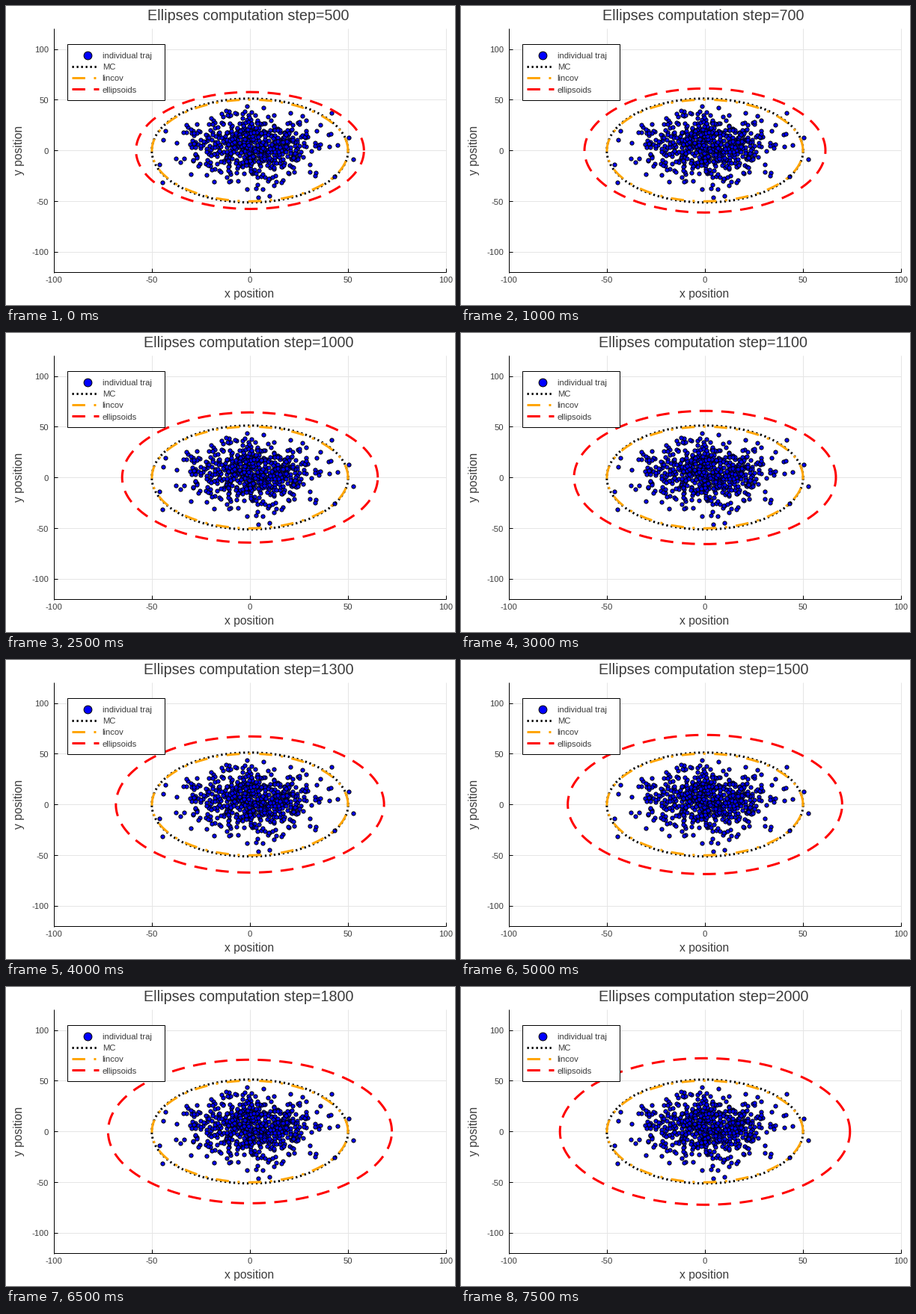
A matplotlib script that plays this animation: 600x400 px, repeating every 8 s.

```python
import numpy as np
import matplotlib.pyplot as plt
from matplotlib.animation import FuncAnimation
from matplotlib.patches import Rectangle

W, H, DPI = 600, 400, 100
PT = 72 / DPI                       # points per pixel
LEFT, RIGHT, TOP, BOTTOM = 64, 588, 30, 356
CX, CY = 326, 193.3
STEPS = 16
INK = "#3c3c3c"
DASH, DOT, DASHDOT = (0, (5.8, 3.85)), (0, (0.75, 1.25)), (0, (5.8, 3.85, 1, 3.85))

plt.rcParams["font.family"] = "Liberation Sans"
fig = plt.figure(figsize=(W / DPI, H / DPI), dpi=DPI, facecolor="white")
ax = fig.add_axes([0, 0, 1, 1])
ax.set(xlim=(0, W), ylim=(H, 0))
ax.axis("off")


def line(x, y, color="black", width=1, style="-", z=1):
    return ax.plot(x, y, color=color, lw=width * PT, ls=style, zorder=z,
                   solid_capstyle="butt", dash_capstyle="butt")[0]


def text(x, y, s, size, ha="center", va="baseline", **kw):
    return ax.text(x, y, s, fontsize=size * PT, color=INK, ha=ha, va=va,
                   zorder=8, **kw)


def dots(x, y, radius, z):
    ax.plot(x, y, "o", ms=2 * radius * PT, mfc="#0000ff", mec="black",
            mew=PT, zorder=z)


def ellipse(rx, ry):
    t = np.linspace(0, 2 * np.pi, 181)
    return CX + rx * np.cos(t), CY - ry * np.sin(t)


# Axes, grid and tick labels
for v in range(-100, 101, 50):
    x, y = CX + 2.62 * v, CY - 1.358 * v
    line([x, x], [TOP, BOTTOM], "#e5e5e5", z=0)
    line([LEFT, RIGHT], [y, y], "#e5e5e5", z=0)
    line([x, x], [BOTTOM, BOTTOM - 5])
    line([LEFT, LEFT + 5], [y, y])
    text(x, 370, v, 11.3)
    text(57, y + 4.3, v, 11.3, ha="right")
line([LEFT, LEFT], [TOP, BOTTOM + 0.5])
line([LEFT, RIGHT], [BOTTOM, BOTTOM])
text(325.5, 390, "x position", 15.6)
text(25, CY, "y position", 15.6, ha="right", va="center", rotation=90)
title = text(324, 19, "", 19.8)

# Scatter: a Gaussian cloud and a few lone points at its edge
rng = np.random.default_rng(7)
cloud = rng.normal(size=(660, 2))
cloud = cloud[np.hypot(*cloud.T) < 2.55] * (45, 22) + (329, 190)
lone = [(464, 204.5), (458, 175.5), (435, 143), (439, 228), (209, 236),
        (205, 212), (210, 179), (213, 167), (337, 256), (352, 254)]
dots(*np.vstack([lone, cloud]).T, 2.6, 2)

line(*ellipse(131.2, 69.5), "black", 3, DOT, 3)
line(*ellipse(131, 68), "#ffa500", 3, DASHDOT, 4)
outer = line([], [], "#ff0000", 3, DASH, 5)

# Legend
ax.add_patch(Rectangle((81.5, 50.5), 130, 75, fc="white", ec="black",
                       lw=PT, zorder=6))
dots([108.7], [66], 5.4, 7)
entries = [("individual traj", None, None), ("MC", "black", DOT),
           ("lincov", "#ffa500", DASHDOT), ("ellipsoids", "#ff0000", DASH)]
for i, (name, color, style) in enumerate(entries):
    y = 66 + 15.1 * i
    if style:
        line([87.7, 123.7], [y, y], color, 3, style, 7)
    text(128.7, y + 4.3, name, 11.3, ha="left")


def half_axes(k):
    """Fast growth at first, then a steady rate."""
    keys = [0, 2, 4, 6, STEPS - 1]
    return (np.interp(k, keys, [152.3, 161, 166.6, 175, 193.8]),
            np.interp(k, keys, [78.2, 83, 85.1, 89.1, 98]))


def update(k):
    title.set_text(f"Ellipses computation step={500 + 100 * k}")
    outer.set_data(*ellipse(*half_axes(k)))
    return title, outer


anim = FuncAnimation(fig, update, frames=STEPS, interval=500,
                     repeat=True, repeat_delay=0, blit=False)
plt.show()
```
